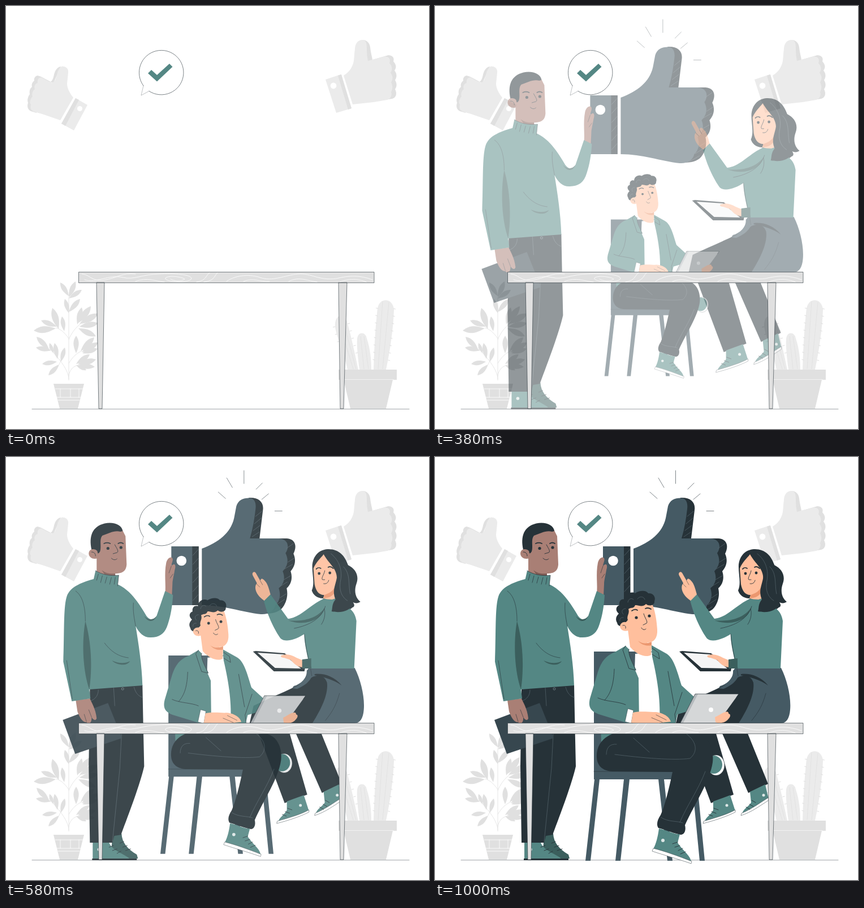
An HTML page that plays this animation: 748x748 px, repeating every 1040 ms.

```html
<!DOCTYPE html>
<html lang="en">
<head>
<meta charset="utf-8">
<title>Team approval</title>
<style>
html, body { margin: 0; width: 100%; height: 100%; overflow: hidden; background: #fff; }
svg { display: block; width: 100vw; height: 100vh; }
.teal { fill: #548784; }
.deep { fill: #3b5f5d; }
.dark { fill: #263238; }
.slate { fill: #455a64; }
.brown { fill: #a97f75; }
.skin { fill: #ffbf9d; }
.pale { fill: #ebebeb; }
.gray { fill: #e0e0e0; }
.white { fill: #fff; }
.ink, .seam, .chalk { fill: none; stroke: #263238; stroke-width: .9; stroke-linecap: round; stroke-linejoin: round; }
.seam { stroke: #56666e; stroke-width: .7; }
.chalk { stroke: #fff; stroke-width: .8; }
.fine { stroke-width: .6; }
.brow { stroke-width: 1.8; }
.sole { fill: #fff; stroke: #263238; stroke-width: .5; }
</style>
</head>
<body>
<svg viewBox="0 0 748 748">
  <!-- backdrop -->
  <g>
    <path class="gray" d="M97 107C91 108 87 113 85 121C84 127 82 132 79 134L62 125L56 123C51 124 49 128 50 132C46 135 45 139 46 143C42 146 41 151 42 156C39 160 37 166 39 171C37 177 38 183 44 186L54 189L60 130L84 136Z"/>
    <path class="pale" d="M119 162C112 153 108 145 108 137L110 118C111 110 105 106 98 107C93 111 91 117 90 122C88 130 86 134 81 136L62 126C57 127 55 131 56 136C51 138 49 142 51 147C47 150 45 155 47 160C43 164 41 170 44 175C42 180 44 185 50 187L64 191L96 202Z"/>
    <path class="pale" d="M123 163L144 175L120 220L98 208Z"/>
    <path class="gray" d="M123 163L129 166L105 212L98 208Z"/>
    <circle class="white" cx="130.5" cy="181.5" r="4.6"/>
    <path class="gray" d="M630 60C639 60 643 66 644 73C645 82 647 89 648 95L676 87C684 87 687 92 685 98C690 103 691 109 687 114C691 119 692 125 688 131C691 136 692 142 688 147C692 155 690 162 683 164L650 169L630 90Z"/>
    <path class="pale" d="M597 123C607 117 613 108 615 97L617 75C618 64 624 59 632 60C638 62 638 69 638 76C638 85 639 91 640 97L667 90C677 88 681 94 678 101C683 106 684 113 680 118C684 123 685 129 681 135C684 141 684 147 681 152C683 159 680 164 674 166L650 170L613 174Z"/>
    <path class="pale" d="M565 130L592 121L611 181L584 189Z"/>
    <path class="gray" d="M587 123L593 121L611 181L605 183Z"/>
    <circle class="white" cx="579" cy="141" r="5.4"/>
    <path class="ink fine" d="M46 712.800H713" opacity=".75"/>
    <g id="plant">
      <path d="M111 662V515M111 660C110 640 90 620 76 604M111 588C103 576 94 570 88 569M111 590C116 577 125 567 132 562M111 632C118 620 125 614 134 610M111 655C112 643 120 636 128 635M94 634L98 625" fill="none" stroke="#e0e0e0" stroke-width=".8"/>
      <path class="gray" d="M84 668H138L127 712H95Z"/>
      <path class="chalk" d="M87 677H136M90 692H132M92 697H130M96 677V692M114 677V692M129 677V692"/>
    </g>
    <g id="cactus">
      <path class="pale" d="M604 643C598 615 586 590 582 568C580 545 597 542 603 558C612 590 618 620 623 643Z"/>
      <path class="pale" d="M625 643C622 620 620 600 621 588C623 575 636 576 638 588C644 605 646 625 646 643Z"/>
      <path class="pale" d="M650 643C651 600 654 560 657 535C660 515 684 515 686 537C685 570 679 610 672 643Z"/>
      <path d="M658 642L666 522M666 642L677 524M589 560L614 642M597 560L619 642M627 584L633 642M633 584L641 642" fill="none" stroke="#e0e0e0" stroke-width=".8"/>
      <path class="gray" d="M588 643H691V661H684L672 712H609L597 661H588Z"/>
      <path class="chalk fine" d="M597 660.5H685"/>
    </g>
    <path class="ink fine" d="M243 141A39.3 39.3 0 1 1 253 150.500"/>
    <path class="ink" d="M243 141L239 158L253 150.500" style="stroke-width:.3"/>
    <path class="teal" d="M251 119L257 113L267 122L289 102L294.500 107.500L267 133.500Z"/>
  </g>

  <g id="man">
    <path class="ink fine" d="M425.500 24V47M395 37L405 54M380 62L393 73.500M458 46L447 57M469 65L457 75M480 95.500H493"/>
    <path class="dark" d="M434 72C452 71 461 80 459 94L453 144H501C516 145 520 157 513 171C518 182 516 193 508 202C512 214 509 225 501 232C504 246 500 256 496 263C490 273 480 277 462 277L420 150Z"/>
    <path class="slate" d="M351 162C380 151 402 135 408 108L412 87C415 76 425 72 436 72.500C446 74 447 84 446 92C444 110 441 127 436 144H487C503 145 507 158 499 170C505 182 503 193 494 202C499 214 496 225 487 232C491 244 489 255 481 262C479 273 468 279 455 278C420 274 390 262 351 262Z"/>
    <path class="seam" d="M446 105L457 96M444 118L456 108M442 130L454 121M440 141L452 133M500 162L513 153M503 186L514 179M497 198L511 190M496 217L508 210M489 229L502 221M489 249L500 242M483 261L497 252M473 275L490 265"/>
    <path class="slate" d="M297 158H345V262H297Z"/>
    <path class="dark" d="M334 158H345.500V262H334Z"/>
    <path class="seam" d="M335 174L345 163M335 190L345 179M335 206L345 195M335 222L345 211M335 238L345 227M335 254L345 243"/>
    <circle class="white" cx="315" cy="183.500" r="8.800"/>
    <path class="brown" d="M286 242C288 227 284 207 288 187C290 179 296 175 299 179C301 183 297 188 297 193C303 186 306 191 303 200C301 212 299 218 299 225L298 246Z"/>
    <path class="ink" d="M297 193L293 205M300 207L295 214" style="stroke-width:.6"/>

    <path class="deep" d="M193 667L209 666C210 682 219 693 236 703L238 710H190Z"/>
    <path class="teal" d="M158 682H187C192 695 209 700 222 709V712H158Z"/>
    <path class="dark" d="M157 710H236V713H157Z"/>
    <path class="ink" d="M187 690L195 687M193 696L201 693M201 701L208 697M206 683L213 680M211 690L219 687M216 696L225 693"/>
    <circle class="white" cx="169" cy="694" r="2.800" opacity=".8"/>
    <path class="dark" d="M153 410L246 403L247 455L249 547C242 578 223 628 208 668L196 670L193 682L153 682L151 545Z"/>
    <path class="seam" d="M209 490L206 550L193 680M168 412C168 421 163 428 155 431M231 407C234 418 239 423 246 425M195 408L197 440"/>
    <circle cx="211" cy="410" r="2" fill="none" stroke="#6c7a81"/>
    <path d="M105 465L185 435L210 497L127 525Z" fill="#37474f"/>
    <path class="brown" d="M128 430L153 427C156 435 163 444 165 462C163 468 158 464 156 460C157 470 151 474 147 469C140 470 134 459 131 450Z"/>
    <path class="ink" d="M156 460L151 447M147 468L143 455" style="stroke-width:.6"/>
    <path class="teal" d="M162 215C142 221 118 228 112 247C106 266 108 310 106 362L121 432L154 427L152 411L246 404C245 368 239 330 234 299C240 312 250 320 261 319C275 319 284 313 289 301C296 283 299 262 300 244L286 237L271 281C266 290 259 289 253 281C240 259 226 237 204 226Z"/>
    <path class="deep" d="M145 290C155 325 158 370 152 411C141 380 138 330 145 290Z"/>
    <path class="deep" d="M192 360C204 365 214 366 224 361C219 370 202 369 192 360ZM249 281C257 290 266 288 271 281C267 292 256 294 249 281Z"/>
    <path class="ink" d="M128 237C142 247 145 270 145 290M234 299C231 283 229 273 230 258M179 329C192 346 205 353 221 355M112 360L122 428" style="stroke-width:.6"/>
    <path class="brown" d="M165 162C164 132 185 120 210 128L216 140L218 190C217 204 208 206 197 206V212L165 207Z"/>
    <path d="M174 200C181 206 190 207 198 206V212L180 209Z" fill="#7e5b54"/>
    <path class="teal" d="M163 201C174 208 190 211 204 209L202 228C185 227 172 224 159 219Z"/>
    <path class="ink" d="M163 201C174 208 190 211 204 209L202 228M168 207L165 218M175 210L172 222M183 212L180 223M191 213L188 225M198 213L196 225" style="stroke-width:.7"/>
    <path class="dark" d="M156 164C151 140 157 123 179 117.500C195 114 210 120 211 131L207 132C197 129 186 135 175 139C169 146 174 158 171 167C167 174 164 169 163 164Z"/>
    <path class="brown" d="M166 166C161 161 151 162 151 171C152 180 162 182 169 178Z"/>
    <path class="ink" d="M156 168C161 168 163 171 163 175M197 155C200 161 205 167 201 169L194 171M191 179C195 183 199 182 201 180"/>
    <path class="ink brow" d="M178 153C182 151 185 151 189 153M203 153C206 151 209 151 212 153"/>
    <g class="dark"><circle cx="185" cy="161.500" r="2.600"/><circle cx="208" cy="160" r="2.600"/></g>
  </g>

  <g id="woman">
    <path class="dark" d="M537 190C540 170 553 163 566 163C584 163 595 175 600 191C614 198 620 210 615 224C610 238 614 250 622 256C618 259 613 259 609 257C612 261 612 265 608 266C598 275 584 276 571 272L556 250C545 250 538 243 536 236C542 222 536 207 537 190Z"/>
    <path class="dark" d="M442 489H497L528 597L488 612ZM508 489H553L589 578L554 594Z"/>
    <path class="teal" d="M492 609L522 598L531 626C515 633 498 639 477 645C478 637 490 631 492 624Z"/>
    <path class="sole" d="M475 644C492 639 515 633 531 624V628C515 636 494 643 474 648Z"/>
    <path class="ink" d="M489 627L497 630M493 621L501 624M484 632L491 635"/>
    <circle class="white" cx="516" cy="616" r="2.500" opacity=".8"/>
    <path class="teal" d="M557 592L584 579L590 605C574 613 559 624 543 631C545 622 555 618 559 611Z"/>
    <path class="sole" d="M542 630C559 623 574 612 590 602V607C574 617 560 628 541 634Z"/>
    <path class="ink" d="M556 614L563 618M560 607L567 611M550 619L557 623"/>
    <circle class="white" cx="581" cy="598" r="2.500" opacity=".8"/>
    <path class="slate" d="M531 373L612 373C623 395 630 425 628 447C627 462 621 471 612 471H520L530 402C520 407 510 408 501 410L504 405C518 401 528 390 527 378Z"/>
    <path class="dark" d="M426 471L433 440C465 424 501 411 531 393C543 383 559 385 563 399C566 423 548 453 537 471Z"/>
    <path class="slate" d="M501 409C515 405 526 394 530 375L540 376C538 390 530 402 510 410Z"/>
    <path class="dark" d="M541 384C556 382 575 387 589 404C575 394 560 390 541 386Z"/>
    <path class="ink fine" d="M534 375L536 387M585 418C579 440 572 451 560 466"/>
    <path class="teal" d="M556 251L578 250C596 264 612 268 615 290L611 374H533C528 350 522 326 523 313C509 322 490 329 481 321C471 307 458 282 451 253L463 243L494 286C516 284 531 263 556 251Z"/>
    <path class="deep" d="M494 289C517 291 542 288 558 268C553 288 525 300 494 289Z"/>
    <path class="ink" d="M558 268C561 278 558 289 553 296M523 313C525 337 530 358 535 373M560 264C553 287 530 298 505 303" style="stroke-width:.7"/>
    <path class="skin" d="M452 254L463 243C460 232 458 224 453 219C448 213 446 215 445 219L437 205C434 201 429 205 432 210L439 223C433 230 437 244 452 254Z"/>
    <path class="ink" d="M445 219L449 226M438 224L444 230" style="stroke-width:.5"/>
    <path class="dark" d="M432 344L437 343L488 347L524 374L523 379L469 379Z"/>
    <path d="M440 346L486 349L517 374L471 373Z" fill="#f5f5f5"/>
    <path class="skin" d="M482 351C491 347 501 350 509 355L521 360L520 372C510 371 505 366 499 359L487 355C483 355 480 353 482 351Z"/>
    <path class="deep" d="M519 358L535 356V374H519Z"/>
    <path class="skin" d="M539 197C544 185 551 180 557 172C565 187 578 195 580 210C581 219 580 224 578 229L578 250L572 252C566 252 560 251 556 250L558 244C548 244 543 236 541 225Z"/>
    <path d="M558 244C567 241 573 237 576 231L577 239C572 247 565 250 557 249Z" fill="#eb976f"/>
    <path class="dark" d="M557 169C564 187 578 194 581 209C579 226 571 236 578 252C571 260 573 268 571 273C591 277 604 270 608 262L600 191C594 174 576 168 557 169Z"/>
    <path class="seam" d="M570 171C586 184 590 202 587 218C583 238 591 249 599 254M592 194C605 207 600 224 604 242"/>
    <path class="ink" d="M559 201C558 208 552 214 555 217H559M557 224C562 225 565 222 566 218"/>
    <path class="ink brow" d="M544 198C547 195 549 195 552 197M565 195C568 193 571 194 574 197"/>
    <g class="dark"><circle cx="549" cy="206" r="2.400"/><circle cx="568" cy="205" r="2.400"/></g>
  </g>

  <g id="sitter">
    <path class="slate" d="M281 344H397V556H421V570H281ZM282 570H291L275 714H266ZM334 570H344L328 714H319ZM395 570H405L420 714H411ZM454 570H463L477 714H468Z"/>
    <path class="ink" d="M281 556H421" style="stroke-width:.6"/>
    <ellipse class="sole" cx="497" cy="545" rx="15" ry="18"/>
    <ellipse class="teal" cx="493" cy="544" rx="15" ry="16"/>
    <path class="teal" d="M293 471H326V489C310 492 303 498 294 504Z"/>
    <path class="dark" d="M318 488C297 495 285 510 286 531C287 549 300 557 320 556L420 557C414 585 407 615 399 633C393 642 391 650 395 656C410 660 423 666 435 668C442 667 444 659 442 651C459 613 486 574 491 540C494 512 481 489 455 489Z"/>
    <path class="seam" d="M445 490C462 503 466 520 451 533C423 537 365 532 318 526M303 526C303 513 310 507 321 508M351 497L379 522M399 637C413 646 428 643 438 647M433 646C445 617 466 588 478 556"/>
    <path class="teal" d="M396 657C408 659 421 667 433 667L429 682C438 696 451 704 453 715L386 693C391 684 394 672 396 657Z"/>
    <path class="sole" d="M386 692C406 697 431 706 454 715L453 719C430 711 405 704 384 697Z"/>
    <path class="ink" d="M420 684L429 681M424 690L433 687M430 696L438 692M434 702L443 698"/>
    <circle class="white" cx="403" cy="678" r="3" opacity=".8"/>
    <path class="white" d="M354 348L385 345L401 390V471H350Z"/>
    <path class="teal" d="M337 334L318 345C302 351 294 362 288 380L274 427C270 444 277 450 290 455L342 471L361 470L360 391L354 377Z"/>
    <path class="teal" d="M383 333L408 347C422 354 428 378 436 404L458 424L446 450L429 455L425 471H397C399 435 395 400 384 353Z"/>
    <path class="teal" d="M337 334L332 341L343 374L356 377C350 364 341 351 343 340ZM383 333L395 345L397 357L384 349Z"/>
    <path class="ink" d="M337 334L332 341L343 374L355 377C350 364 341 351 343 340M384 338L395 346L397 357L384 349M317 375C316 402 311 418 300 430M412 379L423 440M288 426C303 433 324 432 337 438M437 416L424 455L426 470" style="stroke-width:.8"/>
    <path class="sole" d="M341 445L351 448L347 471L336 468Z"/>
    <path class="skin" d="M350 452C364 449 376 451 386 451C398 450 414 457 417 468L399 470H347Z"/>
    <path class="ink" d="M391 456L409 465M383 461L402 469" style="stroke-width:.6"/>
    <path d="M434 470L460 419H537L500 470Z" fill="#d5d7d8"/>
    <path d="M434 470L460 419H465L439 470Z" fill="#b5babd"/>
    <path class="ink" d="M434 470L460 419H537L533 425" style="stroke-width:.7"/>
    <circle class="white" cx="488" cy="447" r="4"/>
    <path class="skin" d="M495 460C502 457 511 450 514 451C517 449 520 452 519 454C523 454 523 459 519 463C514 470 504 472 496 469Z"/>
    <path class="skin" d="M341 305L337 298L342 269C351 259 373 257 385 262C390 276 392 290 393 305C394 321 386 329 375 328L383 333L382 350C374 355 358 351 345 336Z"/>
    <path d="M359 325C368 332 377 329 383 327V333C374 335 365 332 359 325Z" fill="#eb976f"/>
    <path class="dark" d="M322 293C318 286 321 281 325 277C318 271 320 264 326 262C325 255 329 250 336 252C336 242 347 237 354 241C362 235 374 236 377 241C386 240 391 248 388 255C389 262 379 265 373 260C366 267 359 261 354 262C351 269 347 265 342 269C345 277 338 281 341 288C337 294 335 292 336 300C328 300 323 299 322 293Z"/>
    <path class="seam" d="M333 278C328 273 332 268 337 268M341 257C342 250 348 249 351 252M358 251C362 245 370 247 371 252M327 290C326 286 329 283 333 284"/>
    <path class="skin" d="M341 294C336 289 327 293 327 300C329 308 337 309 343 306Z"/>
    <path class="ink" d="M332 298C336 296 338 300 337 303M369 277C371 285 377 291 374 294L368 297M365 302C367 306 371 306 373 304"/>
    <path class="ink brow" d="M348 272C352 269 355 269 358 271M372 268C376 266 379 267 382 269"/>
    <g class="dark"><circle cx="356" cy="284" r="2.600"/><circle cx="379" cy="281" r="2.600"/></g>
  </g>

  <!-- desk -->
  <path d="M160 489H174L170 712H164ZM588 489H603L597 712H591ZM128.500 470.500H651V489.500H128.500Z" fill="#e0e0e0" stroke="#263238" stroke-width=".6"/>
  <path class="chalk" d="M134 474C147 474 151 487 172 485C197 481 205 471 229 474M139 484C160 491 181 474 207 480C225 485 243 474 270 474C298 472 328 475 328 482C325 491 278 488 282 481C289 475 314 480 316 483C309 488 296 486 291 483M229 487C250 479 265 487 280 488M337 488C355 486 354 474 360 472M350 488C370 486 368 476 374 472M390 487C408 474 435 475 449 480C471 488 493 476 516 474C541 472 552 486 584 482C608 476 626 476 648 484M420 487C438 480 447 488 466 487M500 487C519 477 535 487 550 488M590 488C612 480 626 484 637 488"/>
</svg>
<script>
const NS = "http://www.w3.org/2000/svg";
const LOOP = 1040, FPS = 24, SHIFT = 45;
const byId = id => document.getElementById(id);

function add(parent, d, attrs) {
  const el = document.createElementNS(NS, "path");
  el.setAttribute("d", d);
  for (const key in attrs) el.setAttribute(key, attrs[key]);
  parent.append(el);
}

// Each leaf runs from its base to its tip.
const leaves = [
  [111,513,96,489], [111,515,123,487], [111,517,134,502], [111,543,104,518], [111,541,131,518],
  [90,567,62,556], [88,570,49,574], [93,571,82,534], [103,575,99,549], [126,563,134,533],
  [128,560,150,531], [130,562,163,544], [130,567,163,561], [128,570,159,584], [76,607,54,585],
  [80,609,53,604], [84,614,77,596], [91,624,86,596], [97,629,104,604], [90,629,64,633],
  [94,634,75,653], [124,614,124,583], [132,610,156,586], [134,612,163,595], [135,614,162,606],
  [124,633,148,616], [127,634,159,625], [126,636,157,638], [124,635,142,644]
];
for (const [x, y, tx, ty] of leaves) {
  const dx = tx - x, dy = ty - y, nx = -dy * .2, ny = dx * .2;
  const side = s => `${x + dx * .45 + nx * s} ${y + dy * .45 + ny * s}`;
  const edge = s => `${x + dx * .7 + nx * s} ${y + dy * .7 + ny * s}`;
  add(byId("plant"), `M${x} ${y}C${side(1)} ${edge(1)} ${tx} ${ty}C${edge(-1)} ${side(-1)} ${x} ${y}Z`, { class: "gray" });
}

// Short spines down both sides of the tall and left stems.
let spines = "";
for (let i = 0; i < 8; i++) {
  const y = 535 + i * 13;
  spines += `M${658 - i * .8} ${y}l-4 -1M${685 - i * 1.4} ${y}l4 1`;
  if (i < 5) spines += `M${582 + i * 3.8} ${567 + i * 13}l-4 1M${604 + i * 3.5} ${562 + i * 13}l4 -1`;
}
add(byId("cactus"), spines, { stroke: "#e0e0e0", "stroke-width": 1 });

const cubic = (a, b, s) => 3 * a * s * (1 - s) ** 2 + 3 * b * s * s * (1 - s) + s ** 3;

function ease(x) {
  let lo = 0, hi = 1;
  for (let i = 0; i < 30; i++) {
    const mid = (lo + hi) / 2;
    if (cubic(.36, .5, mid) < x) lo = mid; else hi = mid;
  }
  return cubic(-.01, 1.38, lo);
}

const startOf = step => Math.round(step * 100 / FPS) * 10;

function progress(time) {
  let step = 0;
  while (step < FPS && startOf(step + 1) <= time) step++;
  if (step < 3) return 0;
  return step === FPS ? 1 : ease(step / FPS + .007);
}

function pose(id, transform, opacity) {
  byId(id).setAttribute("transform", transform);
  byId(id).setAttribute("opacity", opacity);
}

const begin = performance.now();
function draw() {
  const p = progress((performance.now() - begin) % LOOP);
  const opacity = Math.min(1, p);
  const offset = SHIFT * (1 - p);
  pose("man", `translate(${-offset})`, opacity);
  pose("woman", `translate(${offset})`, opacity);
  pose("sitter", `translate(400 477.5) scale(${.5 + p / 2}) translate(-400 -477.5)`, opacity);
  requestAnimationFrame(draw);
}
draw();
</script>
</body>
</html>
```
